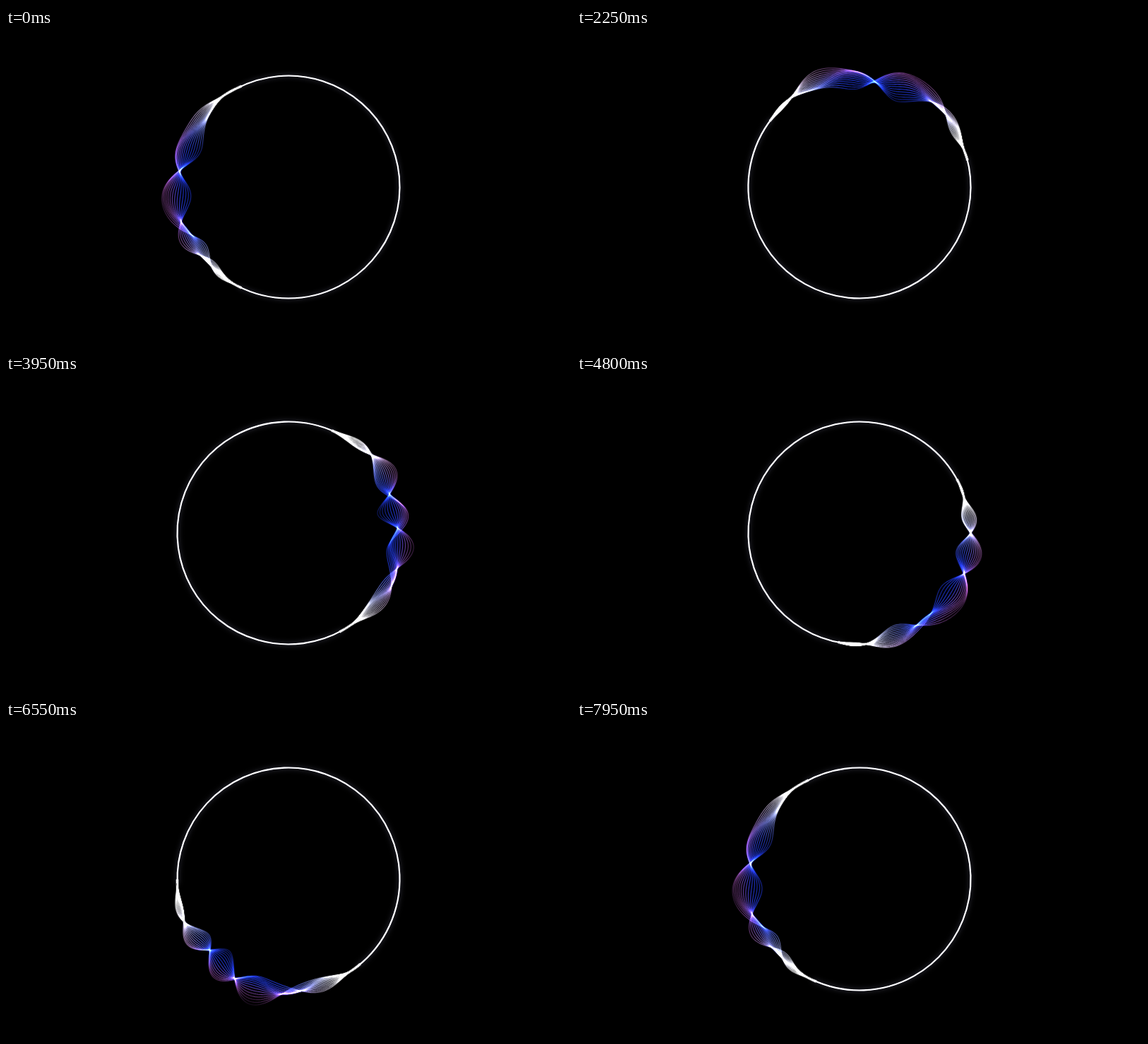
An HTML page with a canvas that plays this animation: 800x450 px, repeating every 8 s.

```html
<!DOCTYPE html>
<html lang="en">
<head>
<meta charset="utf-8">
<title>Ring of waves</title>
<style>
  html, body { margin: 0; width: 100%; height: 100%; overflow: hidden; background: #000; }
  canvas { display: block; width: 100vw; height: 100vh; }
</style>
</head>
<body>
<canvas id="stage" width="800" height="450"></canvas>
<script>
const ctx = document.getElementById('stage').getContext('2d');
const LOOP = 8000, TICK = 50;
const CX = 400, CY = 225, RADIUS = 157.5;
const STRANDS = 15, HALF = 65, LAG = 2;
const RAD = Math.PI / 180;

const sin = deg => Math.sin(deg * RAD);
const cos = deg => Math.cos(deg * RAD);
const mix = (a, b, k) => a + (b - a) * k;
const smooth = x => { x = Math.min(1, Math.max(0, x)); return x * x * (3 - 2 * x); };
const envelope = deg => Math.max(0, 1 - (deg / HALF) ** 2) ** 1.3;

// Six twists round the ring, unevenly spaced by two slow waves.
function twist(angle) {
  let base = angle;
  for (let i = 0; i < 4; i++) {
    base = angle - 11.4 * cos(base + 27) - 10.7 * cos(2 * base + 140);
  }
  return sin(6 * (base - 26));
}

// The waves stay on the ring while the window that reveals them travels round.
function offsetAt(center, deg, s, turn) {
  const angle = center + deg;
  const sway = 5 * cos(5 * (angle - 100));
  const fan = 21 * s * twist(angle - LAG * s);
  const ripple = 3.5 * sin(11 * angle + 125 * s - 3 * turn);
  return envelope(deg) * (sway + fan + ripple) + s * 0.4;
}

function strandColor(deg, offset) {
  const white = smooth((Math.abs(deg) - 18) / 36);
  const outer = smooth((offset + 8) / 26);
  const reach = offset > 0 ? 21 : 30;
  const alpha = mix(0.75 * Math.exp(-((offset / reach) ** 2)), 0.56, white);
  const rgb = [mix(36, 185, outer), mix(64, 95, outer), mix(255, 205, outer)]
    .map(v => Math.round(mix(v, 255, white)));
  return `rgba(${rgb},${alpha.toFixed(3)})`;
}

function drawStrand(center, s, turn) {
  const lead = 15;
  const paint = ctx.createConicGradient((center - HALF - lead) * RAD, CX, CY);
  ctx.beginPath();
  for (let deg = -HALF; deg <= HALF; deg++) {
    const offset = offsetAt(center, deg, s, turn), r = RADIUS + offset;
    ctx.lineTo(CX + r * cos(center + deg), CY + r * sin(center + deg));
    if ((deg + HALF) % 2 === 0) {
      paint.addColorStop((deg + HALF + lead) / 360, strandColor(deg, offset));
    }
  }
  ctx.strokeStyle = paint;
  ctx.globalAlpha = 0.06;
  ctx.lineWidth = 4;
  ctx.stroke();
  ctx.globalAlpha = 1;
  ctx.lineWidth = 1.05;
  ctx.stroke();
}

function drawRing(center) {
  ctx.beginPath();
  ctx.arc(CX, CY, RADIUS, (center + HALF - 2) * RAD, (center + 362 - HALF) * RAD);
  ctx.strokeStyle = '#fff';
  ctx.shadowColor = 'rgba(200,200,255,0.4)';
  ctx.shadowBlur = 7;
  ctx.lineWidth = 2.1;
  ctx.stroke();
  ctx.shadowBlur = 0;
}

function draw(time) {
  const turn = 360 * time / LOOP, center = 180 + turn;
  ctx.globalCompositeOperation = 'source-over';
  ctx.fillStyle = '#000';
  ctx.fillRect(0, 0, 800, 450);
  ctx.globalCompositeOperation = 'lighter';
  ctx.lineJoin = 'round';
  drawRing(center);
  for (let i = 0; i < STRANDS; i++) drawStrand(center, 2 * i / (STRANDS - 1) - 1, turn);
}

const start = performance.now();
let shown = -1;
function tick() {
  const elapsed = Math.max(0, performance.now() - start) % LOOP;
  const time = Math.floor(elapsed / TICK) * TICK;
  if (time !== shown) draw(shown = time);
  requestAnimationFrame(tick);
}
tick();
</script>
</body>
</html>
```
